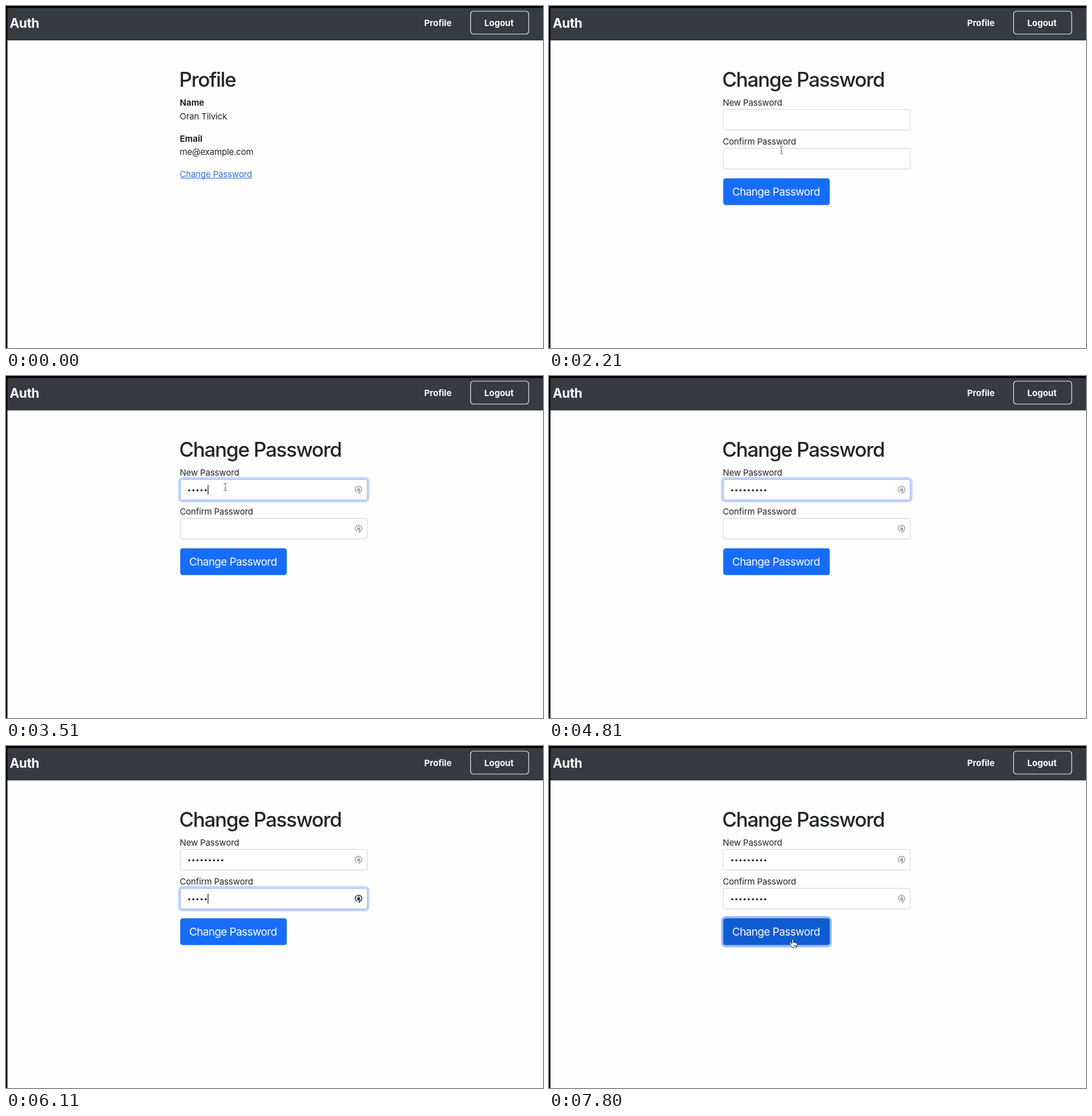
Recreate the animation shown at these times as an HTML page. Size 938 by 597 pixels, loop 8 s.

```html
<!DOCTYPE html>
<html lang="en">
<head>
<meta charset="utf-8">
<title>Change Password</title>
<style>
html, body { margin: 0; width: 100%; height: 100%; overflow: hidden; background: #fefefe; }
svg { display: block; width: 938px; height: 597px; }
text { font: 400 15px Inter, "Open Sans", sans-serif; font-optical-sizing: none; letter-spacing: -.011em; fill: #212529; }
.bold { font-weight: 700; letter-spacing: 0; }
.nav { fill: #fff; }
.brand { font-size: 22.5px; letter-spacing: -.02em; }
.title { font-size: 35px; font-weight: 500; letter-spacing: -.038em; }
.action { font-size: 18.8px; letter-spacing: -.028em; fill: #fff; }
.link { fill: #3471d3; }
.link line { stroke: #3471d3; }
.link text { fill: inherit; }
.link.hover { fill: #2853a4; }
.link.hover line { stroke: #2853a4; }
.box { fill: #fff; stroke: #cfd2d6; }
.ring { fill: none; stroke: #c3d7fc; stroke-width: 4; visibility: hidden; }
.focus > .ring { visibility: visible; }
.focus > .box { stroke: #8bb2f5; }
.icon { color: #96979a; }
.icon.dark { color: #0b0b0b; }
.button .face { fill: #176dfa; }
.button.hover .face { fill: #0f5cd2; }
.button .ring { stroke: #9abdf6; }
.hidden { display: none; }
</style>
</head>
<body>
<svg viewBox="0 0 938 597">
  <defs>
    <g id="lock" fill="none" stroke="currentColor" stroke-width="1.3">
      <path d="M-2.6 5.2A5.7 5.7 0 1 1 2.4 5.1L-.4 7.4M2.4 5.1L-.2 3.9"/>
      <path d="M-1.4-.6V-1.8A1.4 1.4 0 0 1 1.4-1.8V-.6" stroke-width="1"/>
      <rect x="-2.4" y="-.8" width="4.8" height="3.6" rx=".6" fill="currentColor" stroke="none"/>
    </g>
  </defs>

  <rect width="938" height="597" fill="#fefefe"/>
  <rect y="3" width="938" height="57" fill="#363a41"/>
  <rect y="59" width="938" height="1" fill="#2b2e34"/>
  <path d="M0 0H938V3.5H2.5V597H0Z" fill="#000"/>
  <text class="bold nav brand" x="6.5" y="37.5">Auth</text>
  <text class="bold nav" x="730.5" y="35">Profile</text>
  <rect x="811.5" y="9" width="101.5" height="40" rx="5" fill="none" stroke="#f1f2f3" stroke-width="1.2"/>
  <text class="bold nav" x="835.5" y="35">Logout</text>

  <g id="profile">
    <text class="title" x="302.5" y="141">Profile</text>
    <text class="bold" x="303.5" y="174">Name</text>
    <text x="303.5" y="197.5">Oran Tilvick</text>
    <text class="bold" x="303.5" y="236.5">Email</text>
    <text x="303.5" y="260">me@example.com</text>
    <g id="link" class="link">
      <text x="303.5" y="298.5">Change Password</text>
      <line x1="304" y1="300.5" x2="430" y2="300.5"/>
    </g>
  </g>

  <g id="form">
    <text class="title" x="302.5" y="141">Change Password</text>
    <text x="303.5" y="174">New Password</text>
    <text x="303.5" y="242">Confirm Password</text>
    <g id="fields"></g>
    <g id="button" class="button">
      <rect class="ring" x="302.5" y="299" width="189.5" height="50.5" rx="6"/>
      <rect class="face" x="304.3" y="300.7" width="186.2" height="46.8" rx="4.5"/>
      <text class="action" x="320" y="330.7">Change Password</text>
    </g>
  </g>

  <g id="cursor">
    <path id="arrow" d="M0 0V15L3.5 11.8L6 17.2L8.3 16.2L5.9 10.9H10.6Z" fill="#111" stroke="#fff"/>
    <path id="hand" d="M-1.3 1Q0-1 1.3 1V5.5Q2.8 4.6 3.8 6Q5.2 5.3 6.1 6.7Q8.2 6.2 8.2 8.5Q8.2 11 6.8 12.6V14.5H-1V13Q-3 10.8-4.6 8.5Q-5-0.8-1.3 8.2Z
      M2 10V12.5M4 10V12.5M6 10V12.5" fill="#fff" stroke="#333" stroke-width="1" stroke-linejoin="round"/>
    <path id="beam" d="M-3-6.5Q0-6.5 0-4.8Q0-6.5 3-6.5M0-4.8V4.8M-3 6.5Q0 6.5 0 4.8Q0 6.5 3 6.5M-1.5 1.8H1.5" fill="none" stroke="#6c6c6c"/>
  </g>
</svg>
<script>
const LOOP = 8000;
const $ = id => document.getElementById(id);
const toggle = (el, name, on) => el.classList.toggle(name, !!on);

const initial = {
  page: 'profile', cursor: null, at: [0, 0], link: false, button: false,
  focus: null, caret: false, icons: false, darkIcon: false, typed: [0, 0]
};

// [start time in ms, changed state]
const steps = [
  [260, { cursor: 'arrow', at: [590, 575] }],
  [390, { at: [520, 470] }],
  [520, { at: [465, 385] }],
  [650, { at: [432, 325] }],
  [780, { cursor: 'hand', at: [416, 299], link: true }],
  [1040, { at: [419, 296] }],
  [1690, { page: 'form' }],
  [2210, { cursor: 'beam', at: [406, 251.5] }],
  [2340, { at: [398, 224] }],
  [2470, { at: [390, 205], icons: true }],
  [2600, { at: [384, 196] }],
  [2730, { at: [383, 194], focus: 0, caret: true }],
  ...[2990, 3120, 3250, 3380, 3510, 3770, 4030, 4290, 4550].map((t, i) => [t, { typed: [i + 1, 0] }]),
  [3770, { cursor: null }],
  [4810, { caret: false }],
  [5070, { focus: 1, caret: true, darkIcon: true }],
  ...[5200, 5330, 5590, 5850, 6110, 6240, 6370, 6630, 6760].map((t, i) => [t, { typed: [9, i + 1] }]),
  [7020, { cursor: 'beam', at: [384, 198] }],
  [7150, { at: [390, 226] }],
  [7280, { at: [402, 268] }],
  [7410, { cursor: 'hand', at: [415, 309], button: true }],
  [7540, { at: [423, 330] }],
  [7670, { at: [425.5, 337.5] }],
  [7800, { focus: 'button', caret: false, darkIcon: false }]
].sort((a, b) => a[0] - b[0]);

const DOT_PITCH = 7.22;
const dots = y => Array.from({ length: 9 }, (_, i) =>
  `<circle class="dot" cx="${320 + i * DOT_PITCH}" cy="${y + 19.5}" r="1.85" fill="#212529"/>`).join('');

const field = y => `<g class="field">
  <rect class="ring" x="302.5" y="${y - 1.5}" width="330.5" height="40" rx="5.5"/>
  <rect class="box" x="304.5" y="${y + .5}" width="326.5" height="36" rx="3.5"/>
  ${dots(y)}
  <rect class="caret" y="${y + 10}" width="1.2" height="17" fill="#111"/>
  <g class="icon" transform="translate(616 ${y + 18})"><use href="#lock"/></g>
</g>`;
$('fields').innerHTML = field(180) + field(248);
const fields = [...document.querySelectorAll('.field')];

function showField(el, index, s) {
  const focused = s.focus === index;
  toggle(el, 'focus', focused);
  el.querySelectorAll('.dot').forEach((dot, i) => toggle(dot, 'hidden', i >= s.typed[index]));
  const caret = el.querySelector('.caret');
  caret.setAttribute('x', 316.2 + s.typed[index] * DOT_PITCH);
  toggle(caret, 'hidden', !(focused && s.caret));
  const icon = el.querySelector('.icon');
  toggle(icon, 'hidden', !s.icons);
  toggle(icon, 'dark', focused && s.darkIcon);
}

function show(s) {
  for (const page of ['profile', 'form']) toggle($(page), 'hidden', s.page !== page);
  for (const kind of ['arrow', 'hand', 'beam']) toggle($(kind), 'hidden', s.cursor !== kind);
  $('cursor').setAttribute('transform', `translate(${s.at})`);
  toggle($('link'), 'hover', s.link);
  toggle($('button'), 'hover', s.button);
  toggle($('button'), 'focus', s.focus === 'button');
  fields.forEach((el, i) => showField(el, i, s));
}

let shown = -1;
const start = performance.now();
function frame() {
  const t = (performance.now() - start) % LOOP;
  const passed = steps.filter(([at]) => at <= t);
  if (passed.length !== shown) {
    shown = passed.length;
    show(Object.assign({}, initial, ...passed.map(step => step[1])));
  }
  requestAnimationFrame(frame);
}
frame();
</script>
</body>
</html>
```
